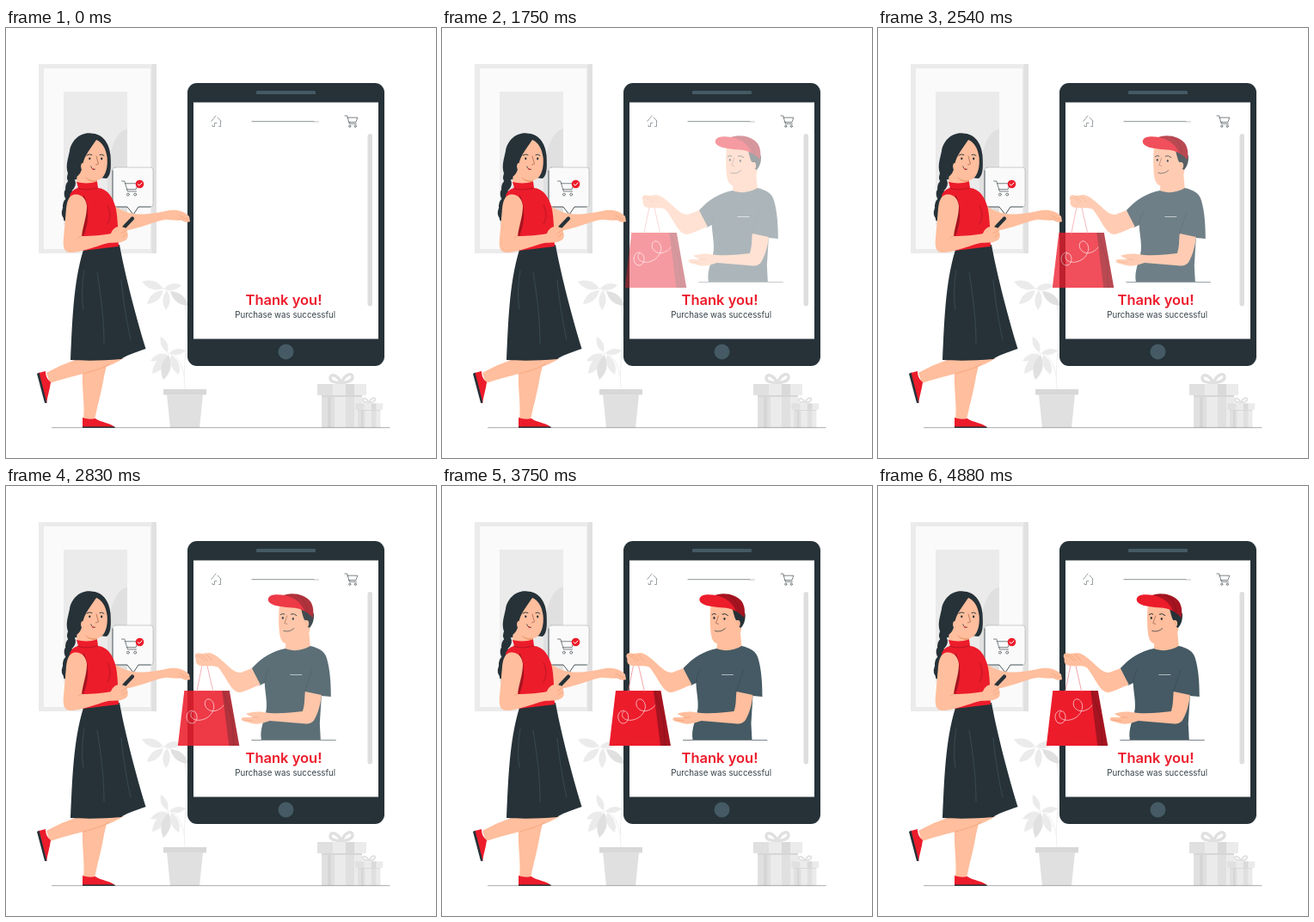
Recreate the animation shown at these times as an HTML page with a canvas. Size 500x500 px, loop 4930 ms.

```html
<!DOCTYPE html>
<html lang="en">
<head>
<meta charset="utf-8">
<title>Thank you</title>
<style>
  html, body { margin: 0; width: 100%; height: 100%; overflow: hidden; background: #fff; }
  canvas { display: block; width: 500px; height: 500px; }
</style>
</head>
<body>
<canvas id="stage" width="500" height="500"></canvas>
<script>
const LOOP = 4930, APPEAR = 580, TRAVEL = 30;
const RED = '#ec1c2b', CRIMSON = '#a51420', DARK = '#263238', SLATE = '#455a64',
      SKIN = '#ffbe9d', BLUSH = '#eb996e', PALE = '#ebebeb', GREY = '#e0e0e0';

const stage = document.getElementById('stage').getContext('2d');
const layer = Object.assign(document.createElement('canvas'), { width: 500, height: 500 }).getContext('2d');
let g = stage;

function fill(color, d) {
  g.fillStyle = color;
  g.fill(new Path2D(d));
}
function line(color, width, d) {
  g.strokeStyle = color;
  g.lineWidth = width;
  g.lineCap = g.lineJoin = 'round';
  g.stroke(new Path2D(d));
}
function box(color, x, y, w, h, r = 0) {
  g.fillStyle = color;
  g.beginPath();
  g.roundRect(x, y, w, h, r);
  g.fill();
}
function oval(color, x, y, rx, ry = rx, turn = 0) {
  g.fillStyle = color;
  g.beginPath();
  g.ellipse(x, y, rx, ry, turn, 0, 7);
  g.fill();
}
function ring(color, width, x, y, r) {
  g.strokeStyle = color;
  g.lineWidth = width;
  g.beginPath();
  g.arc(x, y, r, 0, 7);
  g.stroke();
}
function text(str, x, y, font, color) {
  g.font = font;
  g.fillStyle = color;
  g.textAlign = 'center';
  g.fillText(str, x, y);
}

function leaf(x1, y1, x2, y2, color = PALE) {
  const mx = (x1 + x2) / 2, my = (y1 + y2) / 2;
  const nx = (y2 - y1) * 0.36, ny = (x1 - x2) * 0.36;
  fill(color, `M${x1} ${y1}Q${mx + nx} ${my + ny} ${x2} ${y2}Q${mx - nx} ${my - ny} ${x1} ${y1}Z`);
}

function cart(x, y, s) {
  g.save();
  g.translate(x, y);
  g.scale(s, s);
  line(DARK, 0.6 / s, 'M0 0H3.6L7.5 13H18.5M4.5 3H20.5L18 10.5H6.7');
  ring(DARK, 0.6 / s, 8, 17, 1.6);
  ring(DARK, 0.6 / s, 17, 17, 1.6);
  g.restore();
}

function drawPicture() {
  box(PALE, 38, 42, 132, 220);
  box(GREY, 169.5, 42, 5.5, 220);
  box('#fafafa', 44, 47, 124, 210);
  box(PALE, 67, 74, 74, 155);
  fill(GREY, 'M141 117C128 121 121 138 118 170V229H141Z');
}

function drawPlant() {
  line(PALE, 0.8, 'M208 420C205 390 214 350 209 328C207 315 197 307 182 303M207 405C204 388 198 379 187 378');
  leaf(183, 303, 158, 295);
  leaf(184, 303, 204, 299);
  leaf(183, 305, 164, 321);
  leaf(187, 305, 186, 328);
  leaf(191, 306, 212, 323, GREY);
  leaf(188, 377, 180, 359);
  leaf(190, 378, 209, 375);
  leaf(187, 379, 168, 387);
  leaf(188, 380, 170, 402);
  leaf(189, 380, 183, 409, GREY);
  leaf(192, 380, 201, 403);
  box('#d8d8d8', 183, 420, 50, 6.5);
  fill(GREY, 'M187 426H229L225 465H191Z');
}

function gift(x, y, s) {
  g.save();
  g.translate(x, y);
  g.scale(s, s);
  line(GREY, 3.4, 'M0 -52C-5 -63 -13 -63 -13 -58C-13 -53 -7 -53 0 -52C4 -63 13 -65 13 -59C13 -54 6 -53 0 -52');
  box(PALE, -23, -38, 47, 38);
  box(GREY, -23, -38, 15, 38);
  box('#d6d6d6', -16, -38, 4, 38);
  box(GREY, 5, -38, 10, 38);
  box('#d6d6d6', -23, -38, 47, 2);
  box(PALE, -28, -51, 57, 13);
  box(GREY, -28, -51, 18, 13);
  box('#d9d9d9', 5, -51, 10, 13);
  g.restore();
}

function drawTablet() {
  box(DARK, 211, 64, 229, 329, 11);
  box('#fff', 218, 86.5, 215, 275);
  box(SLATE, 291, 73, 69, 4, 1);
  oval(SLATE, 325.5, 376.5, 9);
  box('#dedede', 420.5, 123, 5.5, 200.5, 2.7);
  line('#80878a', 0.9, 'M286 108.7H358');
  line('#a9adaf', 0.7, 'M358 109H363.5');
  line('#59636a', 0.6, 'M238.8 108.5L244 102M246 104L249.8 108M240 113V114.5H242.5V110.5H245M249.5 108V114.5H247.5');
  cart(394, 102, 0.72);
  text('Thank you!', 323, 322, '600 16.5px Inter, "Open Sans", sans-serif', RED);
  text('Purchase was successful', 324.7, 336.7, '400 9.75px Inter, "Open Sans", sans-serif', '#37434a');
}

function drawBubble() {
  const outline = 'M127 162H168Q171 162 171 165V205Q171 208 168 208H154L148 217L141 208H127Q124 208 124 205V165Q124 162 127 162Z';
  fill('#fafafa', outline);
  line('#9aa0a3', 0.5, outline);
  line(DARK, 0.7, 'M127 208H141L148 217L154 208H168M124 166V204');
  cart(134.5, 178, 0.92);
  oval(RED, 155.5, 181.5, 4.8);
  line('#fff', 1, 'M153.2 181.6L155 183.2L158 180');
}

function drawLegs() {
  fill(SKIN, 'M47 401C62 393 76 386 94 383L137 384C121 394 104 398 90 402C75 406 62 409 51 413Z');
  fill(SKIN, 'M92 384H119L114 405C111 424 106 440 103 456H90C92 437 88 420 89 400Z');
  line(BLUSH, 0.6, 'M90 402C103 398 112 396 120 391');
  fill(RED, 'M38 401L46 399C46 406 49 409 52 412C51 420 48 429 47 437L43 426Z');
  fill(DARK, 'M36 402L38.5 400.5L47.5 436L45 436Z');
  fill(RED, 'M89 453C95 455 99 455 104 454C110 459 123 459 127 465H89Z');
  fill(DARK, 'M89 463.6H126L127 465H89Z');
}

function drawHead() {
  fill(SKIN, 'M105 130C99 136 92 144 88 153L83 164L82 180Q94 184 106 180L106 177C115 176 119 163 117.5 150C116 140 112 133 105 130Z');
  fill(BLUSH, 'M92 173C96 177 101 178 106 177V179C99 179 95 178 92 173Z');
  fill(DARK, 'M106 128C100 139 91 147 89 160C88 167 85 172 80 174L75 146L96 124Z');
  oval(SKIN, 89.5, 161, 2.4, 4);
  oval(DARK, 97.3, 151.8, 1.1, 1.4);
  oval(DARK, 111.2, 152, 1.1, 1.4);
  line(DARK, 0.9, 'M94 148Q97 145.8 100 147.5M109 147.5Q112 146 114 148.4');
  line('#8d4c3c', 0.6, 'M105 149L107.5 158L104.5 159');
  line(DARK, 0.8, 'M98.8 161Q100 165 103.5 164.3');
  fill(RED, 'M99.5 163Q101 166 103 164.5Z');
}

function drawWoman() {
  for (const [x, y, turn] of [[76.5, 172, 0.3], [75, 183, 0.5], [73, 194, -0.2], [71.5, 205, 0.3], [70, 214, 0.1]])
    oval(DARK, x, y, 5.2, 8, turn);
  oval(DARK, 69, 221, 2.2, 3.5);
  fill(DARK, 'M99 122.5C86 121 76 131 74 143C72 153 69 160 72 169C75 178 82 178 90 172L117 175C123 171 122 158 121.5 148C120 133 112 123 99 122.5Z');

  drawLegs();
  fill(DARK, 'M90 258L132 252C137 280 148 325 162.5 373C148 378 139 381 134 385C112 387 91 387 75 386C77 345 78 296 90 258Z');
  line(SLATE, 0.6, 'M91 282C88 298 88 317 90 327M106 284C110 310 114 336 114 367M134 293C136 316 141 345 145 362');

  fill(SKIN, 'M121 204C131 210 139 215 149 216C164 218 178 214 190 212C200 211 207 213 213 219L214 225L210 226L204 223C197 225 190 222 184 223C169 226 153 234 136 236C130 237 126 229 123 222Z');
  line(BLUSH, 0.6, 'M202 218L211 223M201 222L208 225');
  drawHead();
  fill(RED, 'M82 179Q94 182 106 178.5L107 186C116 187 122 193 126 204C130 214 130 231 131 254L89 259C88 240 82 215 74 195C76 189 80 187 84 186Z');
  fill(CRIMSON, 'M90 194C98 207 96 230 89 244L88 229Z');
  line(CRIMSON, 0.7, 'M118 206C122 213 122 222 118 228M83 186C91 189 99 188 106 186');

  fill(SKIN, 'M78 194C86 192 93 197 94 207C94 219 89 232 88 242C100 242 113 241 122 239C124 233 130 229 135 232C141 235 144 242 140 246C134 251 126 249 119 250C103 254 88 261 75 261C67 261 66 254 67 244L70 210C71 201 73 196 78 194Z');
  line(DARK, 4.2, 'M137.5 231.5L147 221.5');
  oval(SKIN, 136, 237, 5, 5.5);
  line(BLUSH, 0.6, 'M134 239L140 235M135 243L141 239M88 242L84 244');
}

function drawBag() {
  fill(CRIMSON, 'M246 238H256L267.5 302H254Z');
  fill(RED, 'M203.5 238H247.5L255.5 302H196Z');
  line('#78101a', 0.5, 'M249 239L259 270L261 302');
  line('#fbd0d3', 0.8, 'M213 261C206 261 204 270 209 275C215 279 221 271 217 264C214 259 209 264 212 269C217 276 236 272 238 257C238 249 231 245 228 250C225 257 233 264 241 261C246 259 248 257 249 255');
}

function drawCourierHead() {
  fill(SKIN, 'M314 139C313 150 313 160 314 170C315 179 318 184 325 184C335 184 345 180 349 169L352 151L347 138Z');
  fill(DARK, 'M339 142L354 148C355 156 352 162 349 165L346 163L345 157C342 156 341 149 339 142Z');
  oval(SKIN, 345.5, 160, 2.8, 4);
  line(BLUSH, 0.6, 'M344.5 158Q347 158 346.5 161.5');
  fill(CRIMSON, 'M317 128C326 123 343 125 350 134C354 140 354 147 353 153C349 149 345 146 340 144Z');
  fill(RED, 'M301 131C303 125 313 126 320 127C331 129 340 136 343 145C333 140 324 142 315 140C307 139 300 136 301 131Z');
  line('#78101a', 0.5, 'M334 126C343 131 347 139 347 148');
  oval(DARK, 318, 153.5, 1.1, 1.4);
  oval(DARK, 330, 154.5, 1.1, 1.4);
  line(DARK, 1, 'M315.5 149.5Q318 147.5 320 149M327.5 149Q331 147.5 334 150.5');
  line('#8d4c3c', 0.6, 'M323 151L320 159.5L323 160.5');
  line(DARK, 0.7, 'M319 168.5Q326 170.5 331 165.5');
}

function drawCourier() {
  line('#5b666c', 0.8, 'M282 295.5H379.5');

  // neck, torso and sleeves
  fill(SKIN, 'M322 176L348 165L350 187C343 195 329 195 321 190Z');
  fill(SLATE, 'M321 189C331 193 341 191 350 186C359 188 367 192 369 200C373 213 374 229 374 245L363 244L361 276L362 295H293C291 281 297 273 299 259C300 249 297 238 297 229L291 232L282 212C294 199 306 192 321 189Z');
  line('#37474f', 0.6, 'M297 229C298 221 300 216 302 213M344 239C346 230 350 222 352 214');
  line('#dfe4e6', 0.7, 'M327 219.5H340');

  // resting arm
  fill(SKIN, 'M344 239L363 243C362 254 359 264 355 271C352 277 346 277 339 276L303 273C296 275 290 278 282 276L271 273C269 271 270 269 273 269L283 269L275 265C279 263 288 262 295 263C312 266 328 263 341 262C344 254 343 246 344 239Z');
  line(BLUSH, 0.6, 'M283 269L290 269M273 272L283 273');

  // bag with its cords, then the hand that holds it
  drawBag();
  line('#ee7c84', 0.7, 'M218 239L225 204M229 204L237 239');
  fill(SKIN, 'M282 212L292 231C283 234 275 239 268 240C258 240 253 223 243 211C237 208 230 210 224 209C219 209 216 206 217 201C214 196 218 193 223 195L233 194C241 196 246 202 252 207C258 213 263 217 269 217Z');
  line(BLUSH, 0.6, 'M218 197Q224 198 227 203M222 196Q228 198 230 203M229 196Q233 199 236 203');
  drawCourierHead();
}

function drawScene() {
  g.fillStyle = '#fff';
  g.fillRect(0, 0, 500, 500);
  drawPicture();
  drawPlant();
  gift(390, 465, 1);
  gift(422, 465, 0.56);
  line('#8d9295', 0.8, 'M53.5 464.7H446');
  drawTablet();
  drawBubble();
  drawWoman();
}

// Eased progress along cubic-bezier(.36, -.01, .5, 1.38), with overshoot.
function ease(u) {
  const curve = (s, a, b) => 3 * (1 - s) ** 2 * s * a + 3 * (1 - s) * s * s * b + s ** 3;
  let lo = 0, hi = 1;
  for (let i = 0; i < 24; i++) {
    const mid = (lo + hi) / 2;
    if (curve(mid, 0.36, 0.5) < u) lo = mid; else hi = mid;
  }
  return curve(lo, -0.01, 1.38);
}

// The courier fades as one group, so he is composed on his own layer.
function composeCourier(progress) {
  g = layer;
  g.clearRect(0, 0, 500, 500);
  g.save();
  g.translate(TRAVEL * (1 - progress), 0);
  drawCourier();
  g.restore();
  g = stage;
  g.globalAlpha = Math.max(0, Math.min(1, progress));
  g.drawImage(layer.canvas, 0, 0);
  g.globalAlpha = 1;
}

const start = performance.now();
function frame() {
  const t = (performance.now() - start) % LOOP;
  drawScene();
  if (t >= APPEAR) composeCourier(ease(t / LOOP));
  requestAnimationFrame(frame);
}
frame();
</script>
</body>
</html>
```
